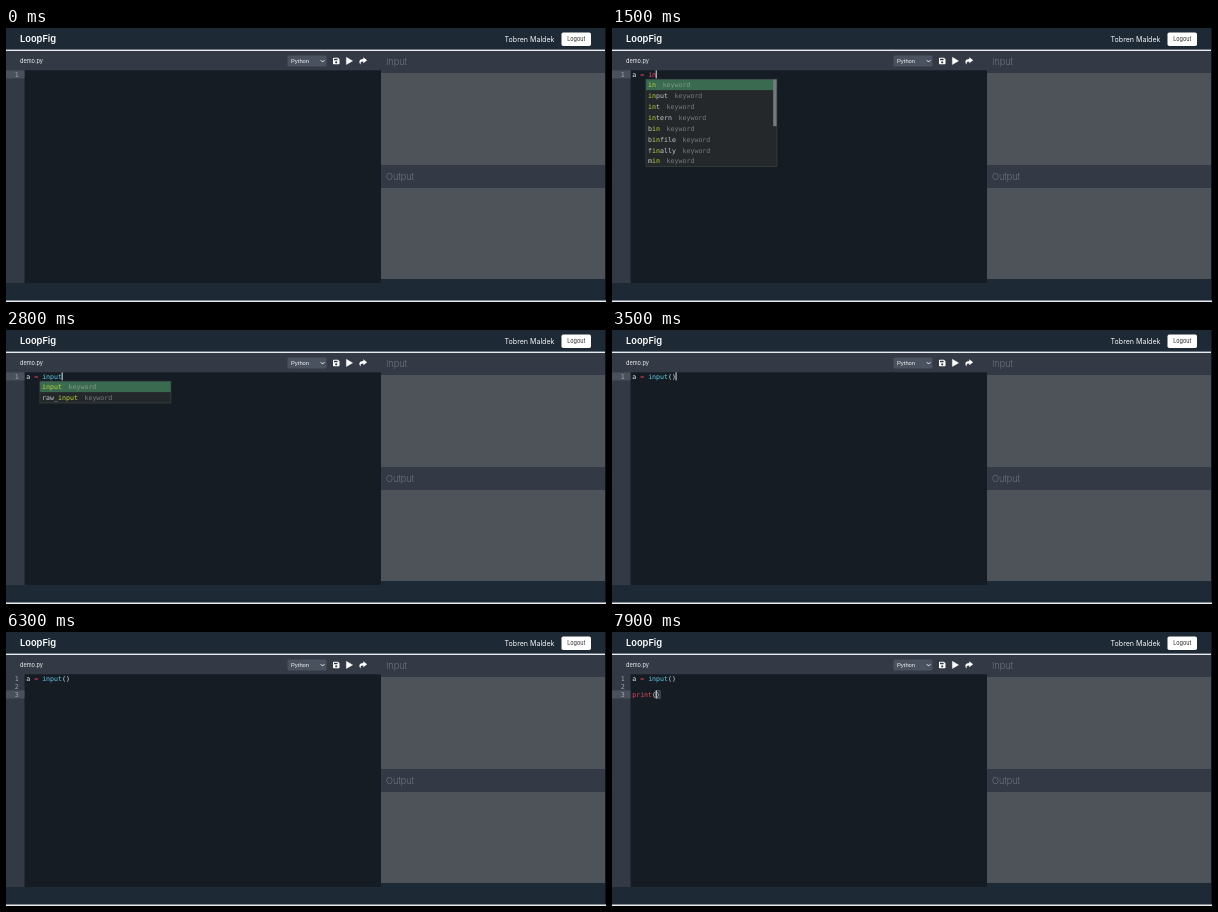
These frames come from a looping animation (600x274 px, 8000 ms). An HTML page:

```html
<!DOCTYPE html>
<html lang="en">
<head>
<meta charset="utf-8">
<style>
  html, body { margin: 0; width: 100%; height: 100%; overflow: hidden; background: #1e2936; }
  svg { display: block; width: 600px; height: 274px; font-family: Inter, "Open Sans", sans-serif; }
  #editor { font: 6.6px "DejaVu Sans Mono", monospace; }
  #editor text { white-space: pre; }
</style>
</head>
<body>
<svg viewBox="0 0 600 274">
  <rect width="600" height="274" fill="#1e2936"/>
  <rect y="21.6" width="600" height="1.5" fill="#e8ecef"/>
  <text x="14" y="14.3" font-size="9.3" font-weight="600" fill="#fff">LoopFig</text>
  <text x="548.5" y="13.8" font-size="7.1" fill="#f4f6f8" text-anchor="end">Tobren Maldek</text>
  <rect x="555.5" y="4.5" width="29.5" height="13.5" rx="1.8" fill="#fff"/>
  <text x="570.2" y="13.3" font-size="5.5" fill="#222" text-anchor="middle">Logout</text>

  <rect y="23" width="375" height="232" fill="#343a45"/>
  <text x="14" y="35" font-size="5.6" fill="#eef0f2">demo.py</text>
  <rect x="281.5" y="27.5" width="39" height="11" rx="1.6" fill="#4b525f"/>
  <text x="285" y="35.3" font-size="5.8" fill="#f2f4f6" font-family="'Liberation Sans', sans-serif">Python</text>
  <path d="M314.8 32.2l1.8 1.8 1.8-1.8" fill="none" stroke="#fff" stroke-width=".9"/>
  <path d="M327 30.4q0-.7.7-.7h4.3l1.5 1.5v4.4q0 .7-.7.7h-5.1q-.7 0-.7-.7zM328 30.7v1.6h3.6v-1.6zM330.2 33.2a1.1 1.1 0 1 0 .01 0z" fill="#fff" fill-rule="evenodd"/>
  <path d="M340.4 29.3l6.2 3.6-6.2 3.6z" fill="#fff" stroke="#fff" stroke-width=".4" stroke-linejoin="round"/>
  <path d="M357.3 29.2l3.8 3-3.8 3v-1.8c-2.2 0-3.2.6-2.5 3.1-2.5-2.4-1.7-5.5 2.5-5.6z" fill="#fff"/>
  <rect x="18.5" y="42.3" width="356.5" height="212.7" fill="#151c24"/>

  <rect x="375" y="23" width="224" height="228" fill="#343a45"/>
  <rect x="375" y="45" width="224" height="92" fill="#4e5359"/>
  <rect x="375" y="160" width="224" height="91" fill="#4e5359"/>
  <g font-size="9.2" font-weight="200" fill="#858b95">
    <text x="380" y="37.4">Input</text>
    <text x="380" y="151.6">Output</text>
  </g>
  <rect x="599" width="1" height="272" fill="#10151b"/>
  <rect y="272.5" width="600" height="1.5" fill="#e8ecef"/>
  <g id="editor"></g>
</svg>
<script>
const LOOP = 8000, CHAR = 3.973, LINE = 8, ROW = 10.9, LEFT = 20.2, TOP = 42.4;
const editor = document.getElementById("editor");
const first = "a = input()\n\n";

// Time, text with "|" as caret, completion prefix
const keys = [
  [-500, "|"], [200, "a|", "a"], [600, "a |"], [800, "a =|"], [900, "a = |"],
  [1300, "a = i|", "i"], [1400, "a = in|", "in"], [1800, "a = inp|", "inp"],
  [2200, "a = inpu|", "inpu"], [2400, "a = input|", "input"],
  [2900, "a = input(|)"], [3500, "a = input()|"], [3900, "a = input()\n|"],
  [4800, first + "|"], [6400, first + "p|", "p"], [6600, first + "pr|", "pr"],
  [6800, first + "pri|", "pri"], [7000, first + "prin|", "prin"],
  [7300, first + "print|"], [7600, first + "print(|)"]
];
const choices = {
  a: "abs all and any apply as assert async",
  i: "id if import in input int intern is",
  in: "in input int intern bin binfile finally min",
  inp: "input raw_input",
  p: "pass pow print property apply compile complex import",
  pr: "print property repr super import operator",
  pri: "print"
};
const colors = { "=": "#d8405a", in: "#ee4a68", print: "#e8465f", input: "#66cbe6" };

const rect = (x, y, w, h, style) => `<rect x="${x}" y="${y}" width="${w}" height="${h}" ${style}/>`;
const text = (x, y, body, style) => `<text x="${x}" y="${y}" ${style}>${body}</text>`;
const span = (body, fill) => `<tspan fill="${fill}">${body}</tspan>`;

function markMatch(word, prefix) {
  const start = word.indexOf(prefix);
  let next = 0;
  return [...word].map((c, i) => {
    const hit = start < 0 ? c === prefix[next] && ++next : i >= start && i < start + prefix.length;
    return span(c, hit ? "#bdd63c" : "#c5cac8");
  }).join("");
}

function popup(prefix, x, y) {
  let key = prefix;
  while (!choices[key]) key = key.slice(0, -1);
  const words = choices[key].split(" "), height = words.length * ROW;
  let out = rect(x, y, 131, height, 'fill="#25282b"') + rect(x, y, 131, ROW, 'fill="#3a6a50"');
  words.forEach((word, i) => {
    const base = y + i * ROW + 7.9;
    out += text(x + 2.2, base, markMatch(word, prefix), "");
    out += text(x + 8.8 + word.length * CHAR, base, "keyword", `fill="${i ? "#777b7d" : "#7f9a8b"}"`);
  });
  if (words.length > 7) out += rect(x + 127.3, y, 3.7, 47, 'fill="#777a7c"');
  return out + rect(x, y, 131, height, 'fill="none" stroke="#3c4a45" stroke-width=".6"');
}

function draw(time) {
  const [start, source, prefix] = keys.filter(k => k[0] <= time).pop();
  const before = source.split("|")[0].split("\n");
  const row = before.length - 1, column = before[row].length;
  const caretX = LEFT + column * CHAR, rowY = TOP + row * LINE;
  let out = rect(0, rowY, 18.5, LINE, 'fill="#4a515c"');

  source.replace("|", "").split("\n").forEach((line, i) => {
    const base = TOP + i * LINE + 6.3;
    const code = line.split(/(\w+|=)/).map(s => span(s, colors[s] || "#e2e8ec")).join("");
    out += text(12.8, base, i + 1, 'fill="#a0a6ae" text-anchor="end"') + text(LEFT, base, code, "");
  });
  if (source.includes("(|)"))
    out += rect(caretX, rowY + .5, CHAR, 7.2, 'fill="none" stroke="#8b9299" stroke-width=".6"');
  if ((time - start) % 1000 < 500 && time >= 100)
    out += rect(caretX - .3, rowY, .9, LINE, 'fill="#f4f6f8"');
  if (prefix)
    out += popup(prefix, LEFT + (column - prefix.length) * CHAR - 2.2, rowY + LINE + .8);
  editor.innerHTML = out;
}

function tick() {
  draw(performance.now() % LOOP);
  requestAnimationFrame(tick);
}
tick();
</script>
</body>
</html>
```
